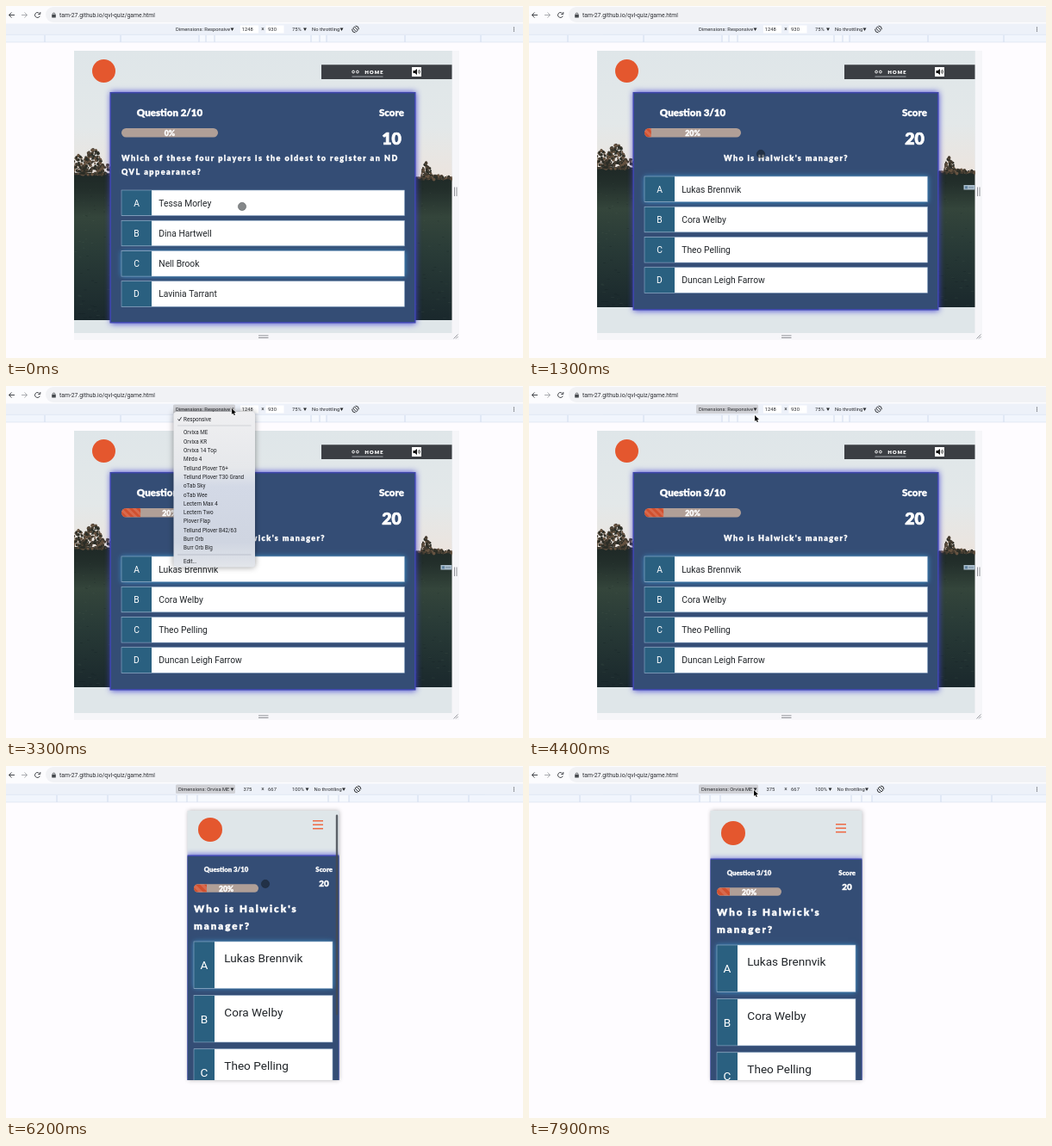
An HTML page with a canvas for the animation above (8000 ms loop, 600 px wide and 409 px high).

```html
<!DOCTYPE html>
<html lang="en">
<head>
<meta charset="utf-8">
<title>Quiz page in a responsive preview</title>
<style>
html, body { margin: 0; width: 100%; height: 100%; overflow: hidden; background: #fefcff; }
canvas { display: block; }
</style>
</head>
<body>
<canvas id="stage" width="600" height="409"></canvas>
<script>
const c = document.getElementById('stage').getContext('2d');
const LOOP = 8000, TAP = 150, NEXT = 1150, OPEN = 2900, CLOSE = 4150, PHONE = 4500;
const UI = 'Roboto, sans-serif', HEAD = 'Lato, sans-serif';
const NAVY = '#344d75', ORANGE = '#e4572e', INK = '#26282c', SKY = '#dfe6e9';

const QUIZ = [
  { lines: ['Which of these four players is the oldest to register an ND', 'QVL appearance?'],
    answers: ['Tessa Morley', 'Dina Hartwell', 'Nell Brook', 'Lavinia Tarrant'] },
  { lines: ["Who is Halwick's manager?"],
    answers: ['Lukas Brennvik', 'Cora Welby', 'Theo Pelling', 'Duncan Leigh Farrow'] }
];
const DEVICES = ['Orvixa ME', 'Orvixa KR', 'Orvixa 14 Top', 'Mirdo 4', 'Tellund Plover T6+',
  'Tellund Plover T30 Grand', 'oTab Sky', 'oTab Wee', 'Lectern Max 4', 'Lectern Two',
  'Plover Flap', 'Tellund Plover B42/63', 'Burr Orb', 'Burr Orb Big'];

// pointer keys: time, x, y
const POINTER = [[0, 274, 233], [300, 274, 233], [1300, 269, 172], [1700, 269, 172],
  [2650, 262, 26], [3400, 262, 26], [3850, 257, 51], [4150, 257, 51], [4400, 262, 34],
  [4700, 262, 26], [5150, 262, 26], [5800, 301, 137], [6800, 301, 137], [7600, 261, 28], [8000, 261, 28]];
// scroll keys: time, offset
const SCROLL = [[0, 0], [6050, 0], [6200, 4], [6500, 36], [6750, 36], [7150, 0], [8000, 0]];

const clamp = v => Math.max(0, Math.min(1, v));
const smooth = v => v * v * (3 - 2 * v);

function keyed(keys, t) {
  const i = Math.max(1, keys.findIndex(k => k[0] > t));
  const a = keys[i - 1], b = keys[i], p = smooth(clamp((t - a[0]) / (b[0] - a[0])));
  return a.slice(1).map((v, n) => v + (b[n + 1] - v) * p);
}

function rect(x, y, w, h, fill, r = 0) {
  c.fillStyle = fill;
  c.beginPath();
  c.roundRect(x, y, w, h, r);
  c.fill();
}

function line(color, width, ...pts) {
  c.strokeStyle = color;
  c.lineWidth = width;
  c.beginPath();
  for (let i = 0; i < pts.length; i += 2) c.lineTo(pts[i], pts[i + 1]);
  c.stroke();
}

function dot(x, y, r, fill) {
  c.fillStyle = fill;
  c.beginPath();
  c.arc(x, y, r, 0, 7);
  c.fill();
}

// text centred vertically on y
function text(s, x, y, font, fill, align = 'left', gap = 0) {
  c.font = font;
  c.fillStyle = fill;
  c.textAlign = align;
  c.textBaseline = 'alphabetic';
  c.letterSpacing = gap + 'px';
  c.fillText(s, x, y + parseFloat(font.match(/[\d.]+px/)[0]) * .36);
}
const ui = (s, x, y, size, fill = INK, align) => text(s, x, y, `${size}px ${UI}`, fill, align);

// headings get a thin outline for extra weight
function head(s, x, y, size, align, gap) {
  text(s, x, y, `900 ${size}px ${HEAD}`, '#fff', align, gap);
  c.strokeStyle = '#fff';
  c.lineWidth = size * .035;
  c.strokeText(s, x, y + size * .36);
}

function clipped(x, y, w, h, draw) {
  c.save();
  c.beginPath();
  c.rect(x, y, w, h);
  c.clip();
  draw();
  c.restore();
}

function glow(color, blur, draw) {
  c.save();
  c.shadowColor = color;
  c.shadowBlur = blur;
  draw();
  c.restore();
}

function panel(x, y, w, h) {
  glow('#4343d2', 7, () => rect(x - 1.5, y - 1.5, w + 3, h + 3, '#3f47ad'));
  rect(x, y, w, h, NAVY);
}

function shade(y0, y1, ...stops) {
  const g = c.createLinearGradient(0, y0, 0, y1);
  for (const [p, color] of stops) g.addColorStop(p, color);
  return g;
}

function caret(x, y) {
  c.fillStyle = INK;
  c.beginPath();
  c.moveTo(x - 2, y - 1.5);
  c.lineTo(x + 2, y - 1.5);
  c.lineTo(x, y + 2);
  c.fill();
}

function browserBar() {
  rect(0, 0, 600, 21, '#fcfcfe');
  rect(46, 1, 570, 18, '#f1f2f5', 9);
  line('#45484d', 1, 10, 10.5, 3.5, 10.5, 6.5, 7.5);
  line('#45484d', 1, 3.5, 10.5, 6.5, 13.5);
  line('#a9abb0', 1, 18, 10.5, 24.5, 10.5, 21.5, 7.5);
  line('#a9abb0', 1, 24.5, 10.5, 21.5, 13.5);
  c.strokeStyle = '#45484d';
  c.beginPath();
  c.arc(36.5, 10.5, 3, .4, 5.5);
  c.stroke();
  line('#45484d', 1, 39.8, 7, 39.8, 9.5, 37.3, 9.5);
  rect(53.2, 9.8, 4.6, 3.7, '#45484d', .6);
  c.lineWidth = .8;
  c.beginPath();
  c.arc(55.5, 9.6, 1.5, Math.PI, 0);
  c.stroke();
  ui('tam-27.github.io/qvl-quiz/game.html', 62, 10.5, 6.8, '#2c2e33');
}

function toolBar(phone, hot) {
  rect(0, 20.5, 600, 13, '#edf1f9');
  rect(0, 33, 600, 9, '#f1f5fd');
  const ticks = phone ? [239, 180, 100, 88, 76] : [253, 165, 74, 66, 56];
  rect(298 - ticks[2], 33, 2 * ticks[2], 9, '#f6f9fe');
  for (const d of ticks)
    for (const x of [298 - d, 298 + d]) line('#c9d5ea', .8, x, 34, x, 42);
  line('#d9e1ef', .7, 0, 33.3, 600, 33.3);
  line('#d9e1ef', .7, 0, 42, 600, 42);

  const x = phone ? 200 : 197, shift = phone ? 2.5 : 0;
  if (hot) rect(x - 3, 21.5, 269 - x, 10.5, '#d0d1d6', 1.5);
  ui('Dimensions: ' + (phone ? DEVICES[0] : 'Responsive'), x, 27, 5.8);
  caret(262.5, 27);
  if (!phone) {
    rect(272, 22.5, 21, 9, '#fff');
    rect(301.5, 22.5, 21, 9, '#fff');
  }
  ui(phone ? '375' : '1248', 280.3, 27, 5.8, INK, 'center');
  ui('×', 298, 27, 6.5, INK, 'center');
  ui(phone ? '667' : '930', 309, 27, 5.8, INK, 'center');
  ui(phone ? '100%' : '75%', 332, 27, 5.8);
  caret(347 + shift, 27);
  ui('No throttling', 355 + shift, 27, 5.8);
  caret(389.5 + shift, 27);

  c.save();
  c.translate(405.5 + shift, 27);
  c.rotate(-.75);
  c.strokeStyle = INK;
  c.lineWidth = .9;
  c.strokeRect(-1.3, -2.8, 2.6, 5.6);
  for (const a of [0, Math.PI]) {
    c.beginPath();
    c.arc(0, 0, 3.9, a - .8, a + .8);
    c.stroke();
  }
  c.restore();
  for (const y of [25, 27, 29]) dot(589.5, y, .6, INK);
}

function photo(h) {
  let seed = 7;
  const rnd = () => (seed = seed * 16807 % 2147483647) / 2147483647;
  const top = 52, k = h / 298, left = top + 135 * k, right = top + 141 * k;
  const ground = x => left + (right - left) * (x - 79) / 438;
  clipped(79, top, 438.5, h, () => {
    rect(79, top, 439, h, shade(top, right, [0, SKY], [.6, '#e3e8e9'], [1, '#ece4de']));
    c.fillStyle = shade(left, top + h, [0, '#1e2826'], [.12, '#232f2b'], [.3, '#34453b'], [.55, '#293b37'], [1, '#1a282c']);
    c.beginPath();
    for (const [x, y] of [[79, left], [518, right], [518, top + h], [79, top + h]]) c.lineTo(x, y);
    c.fill();
    for (let i = 0; i < 500; i++) {
      const d = rnd();
      rect(79 + rnd() * 439, right + 12 + d * h * .5, 1 + d * 3, .7, i % 2 ? 'rgba(120,140,120,.13)' : 'rgba(5,15,18,.22)');
    }
    const bush = (x, w, tall, n) => {
      for (let i = 0; i < n; i++) {
        const u = rnd() * 2 - 1, v = rnd(), px = x + u * w;
        dot(px, ground(px) + 2 - v * tall * k * (1 - u * u * .7), .6 + rnd() * 1.3, ['#2b2d26', '#433b30', '#665341'][i % 3]);
      }
    };
    bush(84, 9, 22, 90);
    bush(101, 12, 29, 200);
    bush(116, 9, 12, 60);
    bush(488, 6, 19, 90);
    bush(500, 25, 5, 90);
  });
}

function speaker(x, y, s) {
  rect(x, y, s, s, '#fff');
  c.save();
  c.translate(x, y);
  c.scale(s / 11, s / 11);
  c.fillStyle = '#111';
  c.beginPath();
  for (const [px, py] of [[1.5, 4], [3.5, 4], [6, 2], [6, 9], [3.5, 7], [1.5, 7]]) c.lineTo(px, py);
  c.fill();
  c.strokeStyle = '#111';
  c.lineWidth = .8;
  for (const r of [1.6, 3.2]) {
    c.beginPath();
    c.arc(6.2, 5.5, r, -.9, .9);
    c.stroke();
  }
  c.restore();
}

function homeLink(x, y, size) {
  c.strokeStyle = '#fff';
  c.lineWidth = 1;
  for (const d of [1.6, 6.4]) {
    c.beginPath();
    c.arc(x + d, y, 1.4, 0, 7);
    c.stroke();
  }
  head('HOME', x + 15, y, size, 'left', 1.2);
  line('#cfd3d6', .7, x, y + 5.5, x + 36, y + 5.5);
}

function progress(x, y, w, h, fill, label, size, step, t) {
  rect(x, y, w, h, '#b09f97', h / 2);
  c.save();
  c.beginPath();
  c.roundRect(x, y, w, h, h / 2);
  c.clip();
  clipped(x, y, fill, h, () => {
    rect(x, y, fill, h, '#d0502f');
    const off = step * (1 - t / 1000 % 1);
    for (let s = x - 3 * step + off; s < x + w; s += step)
      line('rgba(255,255,255,.15)', step * .36, s, y - 1, s + h + 2, y + h + 1);
  });
  c.restore();
  head(label, x + w / 2, y + h / 2 + .5, size, 'center');
}

function answers(list, o) {
  list.forEach((name, i) => {
    const y = o.y + i * o.pitch, body = () => rect(o.x, y, o.w, o.h, '#fff');
    if (i === o.lit) glow('#3a8fc4', 6, body);
    else body();
    if (i === o.right) rect(o.x, y, o.w, o.h, '#2e9e4b');
    rect(o.x, y, o.key, o.h, '#2a6080');
    c.strokeStyle = '#8fabc8';
    c.lineWidth = .6;
    c.strokeRect(o.x, y, o.w, o.h);
    ui('ABCD'[i], o.x + o.key / 2, y + o.h / 2, o.size, '#fff', 'center');
    ui(name, o.x + o.key + o.pad, y + o.textY, o.size, '#212529');
  });
}

function widePage(t) {
  const next = t >= NEXT, q = QUIZ[+next], h = next ? 298 : 313;
  rect(79, 52, 447, 336, '#f6f6f9');
  rect(79, 52, 438.5, 328, SKY);
  photo(h);
  dot(113.5, 75.5, 13.5, ORANGE);
  rect(366, 68.3, 151.5, 16.7, '#3b3e43');
  homeLink(401.5, 76.5, 5.6);
  speaker(471, 71, 11);
  if (next) {
    rect(504.5, 208, 13, 5.5, '#a9bccb');
    rect(506, 209.3, 3, 3, '#5c7f9d');
    rect(510, 210.3, 6, 1, '#71879a');
  }

  clipped(79, 52, 438.5, 328, () => panel(122, 101.5, 352, h - 47.5));
  head('Question ' + (next ? '3/10' : '2/10'), 190, 124, 11.5, 'center');
  head('Score', 462, 124, 11.5, 'right');
  head(t < TAP ? '10' : '20', 447.5, 153.5, 19.5, 'center');
  progress(134, 142, 112, 10.5, 22.4 * clamp((t - 1090) / 600) * next, next ? '20%' : '0%', 8.8, 8, t);
  if (next) head(q.lines[0], 298.5, 177, 9, 'center', 1.36);
  else q.lines.forEach((s, i) => head(s, 134, 177 + i * 16, 9, 'left', 1.48));
  answers(q.answers, { x: 134, y: next ? 198 : 214, w: 328.5, h: 29.6, pitch: 35.25, key: 35, pad: 8.3,
    size: 10.3, textY: 14.9, lit: t < TAP ? 2 : 0, right: !next && t >= TAP ? 0 : -1 });

  for (const d of [0, 2.5]) {
    line('#84868c', .9, 520.5 + d, 210.5, 520.5 + d, 221);
    line('#84868c', .9, 293, 383 + d, 304.5, 383 + d);
  }
  line('#84868c', .8, 519.5, 386.5, 524.5, 381.5);
  line('#84868c', .8, 522, 386.5, 524.5, 384);
}

function phonePage(t) {
  const [s] = keyed(SCROLL, t);
  glow('rgba(0,0,0,.3)', 5, () => rect(210.5, 52, 176, 313, SKY));
  clipped(210.5, 52, 176, 313, () => {
    c.save();
    c.translate(0, -s);
    dot(237, 78, 14, ORANGE);
    for (const y of [67.8, 72.3, 76.8]) line('#ee6a45', 1.6, 356, y, 368, y);
    panel(210.5, 109, 176, 363);
    head('Question 3/10', 255.5, 124, 7.8, 'center');
    head('Score', 379, 124, 7.8, 'right');
    head('20', 369, 140, 10, 'center');
    progress(218, 141.3, 75, 9.5, 15, '20%', 8.6, 10, t);
    head("Who is Halwick's", 218, 169.5, 11.5, 'left', 2);
    head('manager?', 218, 190, 11.5, 'left', 2);
    answers(QUIZ[1].answers, { x: 218, y: 208, w: 161, h: 54.5, pitch: 62.4, key: 24, pad: 11.3,
      size: 13.6, textY: 19.5, lit: 0, right: -1 });
    c.restore();

    // side menu leaving to the right
    const x = 210.5 + 176 * clamp((t - PHONE) / 232);
    if (x < 386) {
      rect(x, 52, 176, 313, 'rgba(12,14,16,.76)');
      homeLink(x + 15, 134, 8);
      speaker(x + 14.5, 171.5, 14);
    }
    c.globalAlpha = clamp((t - 6050) / 100) * clamp((7700 - t) / 250);
    rect(382.8, 56.5 + s * .74 - 3, 2.4, 233, 'rgba(70,74,82,.85)', 1.2);
    c.globalAlpha = 1;
  });
}

function deviceMenu(t, py) {
  c.globalAlpha = clamp((CLOSE + 150 - t) / 150);
  glow('rgba(0,0,0,.4)', 7, () => rect(194.5, 30, 94.5, 180.5,
    shade(30, 210, [0, '#efeff1'], [.36, '#e6e8eb'], [.48, '#d3d9e6'], [.84, '#cfd5e1'], [1, '#e2e5ea']), 3.5));
  const item = (s, y) => {
    const over = Math.abs(py - y) < 5 && py > 33;
    if (over) rect(197, y - 5, 89.5, 10, '#4a86e0', 2);
    ui(s, 206, y, 6.3, over ? '#fff' : '#202226');
  };
  item('Responsive', 38.3);
  line('#202226', .9, 199.5, 38.5, 201, 40.3, 203.5, 36.3);
  line('#c3c5ca', .7, 199, 46, 284.5, 46);
  DEVICES.forEach((s, i) => item(s, 54 + i * 10.32));
  line('#aeb4c0', .7, 199, 196, 284.5, 196);
  item('Edit…', 203.5);
  c.globalAlpha = 1;
}

function pointer(x, y) {
  if (y > 52) {
    dot(x, y, 4.7, 'rgba(20,24,28,.52)');
    c.strokeStyle = 'rgba(20,24,28,.35)';
    c.lineWidth = .8;
    c.stroke();
    return;
  }
  c.beginPath();
  for (const [dx, dy] of [[0, 0], [0, 7], [1.6, 5.6], [2.7, 8], [3.9, 7.5], [2.8, 5.1], [5, 5]]) c.lineTo(x + dx, y + dy);
  c.closePath();
  c.strokeStyle = '#fff';
  c.lineWidth = 1.2;
  c.stroke();
  c.fillStyle = '#000';
  c.fill();
}

function draw(t) {
  const phone = t >= PHONE, [x, y] = keyed(POINTER, t);
  rect(0, 0, 600, 409, '#fefcff');
  browserBar();
  toolBar(phone, t >= 2600);
  (phone ? phonePage : widePage)(t);
  if (t >= OPEN && t < CLOSE + 150) deviceMenu(t, y);
  pointer(x, y);
}

const start = performance.now();
function tick() {
  draw((performance.now() - start) % LOOP);
  requestAnimationFrame(tick);
}
tick();
</script>
</body>
</html>
```
